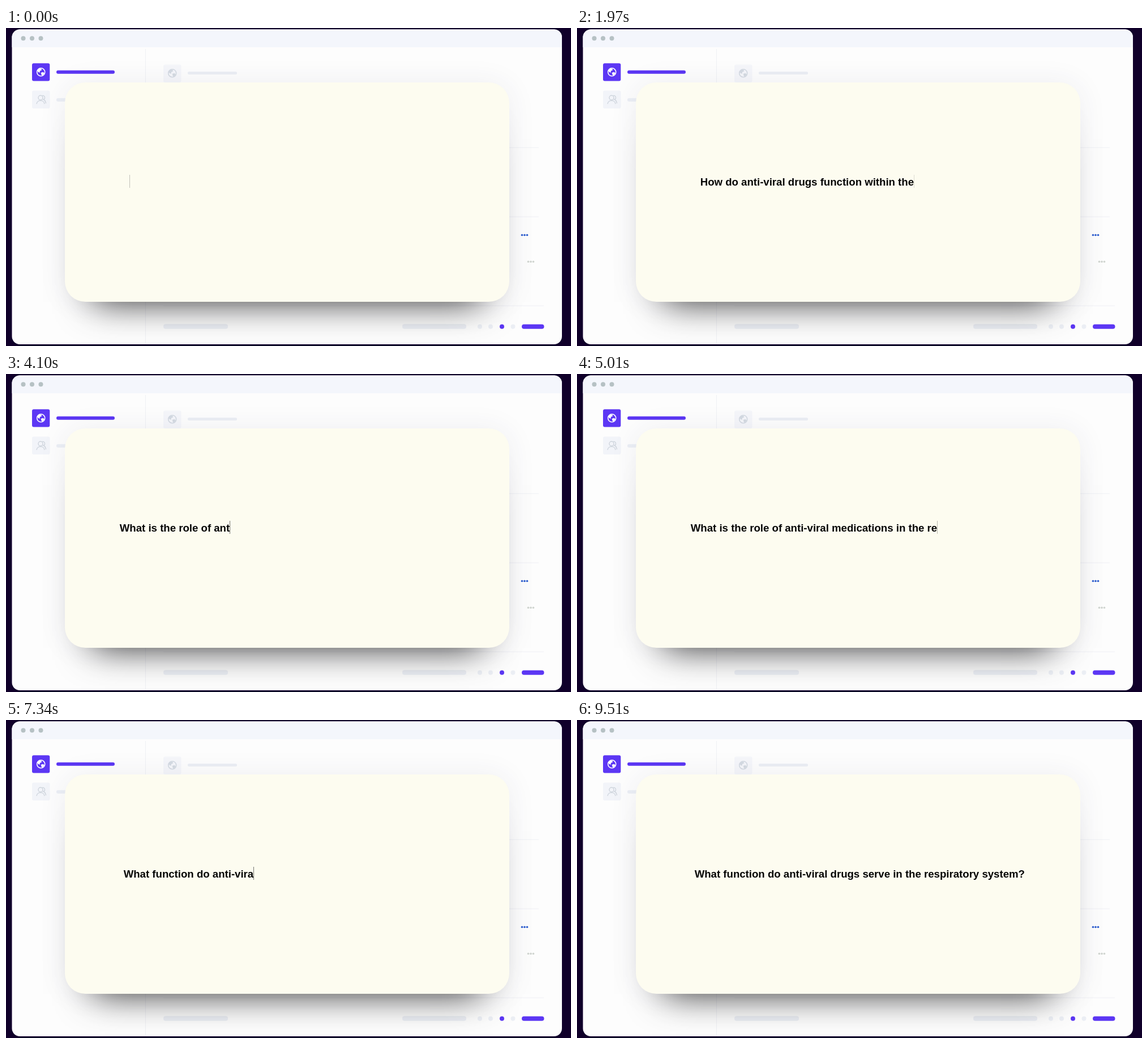
Recreate the animation shown at these times as an HTML page. Size 998 px wide and 561 px high, loop 9.54 s.

```html
<!DOCTYPE html>
<html lang="en">
<head>
<meta charset="utf-8">
<title>Typing questions</title>
<style>
  html, body { margin: 0; width: 100%; height: 100%; overflow: hidden; background: #10002a; }
  svg { position: absolute; left: 0; top: 0; display: block; }
  #card {
    position: absolute; left: 104px; top: 96px; width: 785px; height: 387px;
    border-radius: 36px; background: #fdfcf0;
    box-shadow: 0 50px 60px -50px rgba(0, 0, 0, .8), 0 2px 50px rgba(50, 50, 93, .08);
  }
  #line {
    position: absolute; top: 260px; white-space: pre; color: #050505;
    font: bold 18.62px/23px "Liberation Sans", Arial, sans-serif;
  }
  #caret { position: absolute; left: 100%; top: -1px; width: 1px; height: 23px; background: #222; }
</style>
</head>
<body>
<svg width="998" height="561" viewBox="0 0 998 561">
  <defs>
    <clipPath id="frame"><rect x="10.5" y="2.5" width="971.5" height="555.5" rx="14"/></clipPath>
    <g id="globe">
      <circle r="7" fill="none" stroke="currentColor" stroke-width="1.6"/>
      <path d="M-6-3 L-3-6 L1-6 L1-3 L-2-2 L-2 1 L-5 0Z M0 1 L4 0 L6 2 L3 6 L1 5Z" fill="currentColor"/>
    </g>
    <g id="dots"><circle cx="-4.5" r="1.8"/><circle r="1.8"/><circle cx="4.5" r="1.8"/></g>
  </defs>
  <g clip-path="url(#frame)">
    <rect width="998" height="561" fill="#fdfdfd"/>
    <rect width="998" height="34" fill="#f4f6fc"/>
    <g fill="#b6c1c4">
      <circle cx="30.5" cy="18.3" r="4"/><circle cx="46" cy="18.3" r="4"/><circle cx="61.5" cy="18.3" r="4"/>
    </g>
    <g stroke="#eff0f5">
      <path d="M246.5 37V558"/>
      <path d="M278 211H941M278 333H941M278 490H950"/>
    </g>
    <g fill="#5c37f4">
      <rect x="46" y="62.3" width="31.3" height="31.3" rx="3"/>
      <rect x="89" y="74.8" width="103" height="6" rx="3"/>
      <circle cx="876" cy="526.7" r="4"/>
      <rect x="911" y="522.7" width="39.5" height="8" rx="4"/>
    </g>
    <g fill="#eceff5">
      <rect x="46" y="110.5" width="31.5" height="31.5" rx="3" fill="#f2f4f9"/>
      <rect x="278" y="64.5" width="31.5" height="31.5" rx="3" fill="#f5f6fa"/>
      <rect x="89" y="123.8" width="103" height="6" rx="3"/>
      <rect x="321" y="77" width="87" height="5" rx="2.5"/>
      <rect x="278" y="522.3" width="114" height="8.5" rx="4"/>
      <rect x="700" y="522.3" width="113" height="8.5" rx="4"/>
      <circle cx="837" cy="526.7" r="4"/><circle cx="856" cy="526.7" r="4"/><circle cx="895.5" cy="526.7" r="4"/>
    </g>
    <use href="#globe" x="61.7" y="77.8" color="#fff"/>
    <use href="#globe" x="293.7" y="79.7" color="#d4dae2"/>
    <g fill="none" stroke="#cfd5dd" stroke-width="1.4">
      <circle cx="61" cy="123" r="4"/>
      <path d="M54 134C55 126 67 126 68 134M64 119.5C69 118 70 125 66 126C69 127 70 130 70.5 133"/>
    </g>
    <use href="#dots" x="916" y="365.3" fill="#2f5fd0"/>
    <use href="#dots" x="927" y="412.3" fill="#d0d5d0"/>
  </g>
</svg>
<div id="card"></div>
<div id="line"><span id="typed"></span><span id="caret"></span></div>
<script>
  const LOOP = 9540, CHAR_MS = 31, BLINK = 1000;
  const questions = [
    { shown: 0, typing: 627, x: 217.7, text: "How do anti-viral drugs function within the respiratory system?" },
    { shown: 3100, typing: 3372, x: 200.8, text: "What is the role of anti-viral medications in the respiratory system?" },
    { shown: 6250, typing: 6518, x: 207.7, text: "What function do anti-viral drugs serve in the respiratory system?" }
  ];
  const line = document.getElementById("line");
  const typed = document.getElementById("typed");
  const caret = document.getElementById("caret");

  function caretOpacity(t) {
    const phase = (t + 60) % BLINK;
    return phase < 560 ? 0.8 * Math.sin(Math.PI * phase / 560) : 0;
  }

  function draw(now) {
    const t = now % LOOP;
    const question = questions.findLast(q => t >= q.shown);
    const count = Math.max(0, Math.floor((t - question.typing) / CHAR_MS));
    line.style.left = question.x + "px";
    typed.textContent = question.text.slice(0, count);
    caret.style.opacity = caretOpacity(t);
  }

  const start = performance.now();
  function tick() {
    draw(performance.now() - start);
    requestAnimationFrame(tick);
  }
  tick();
</script>
</body>
</html>
```
